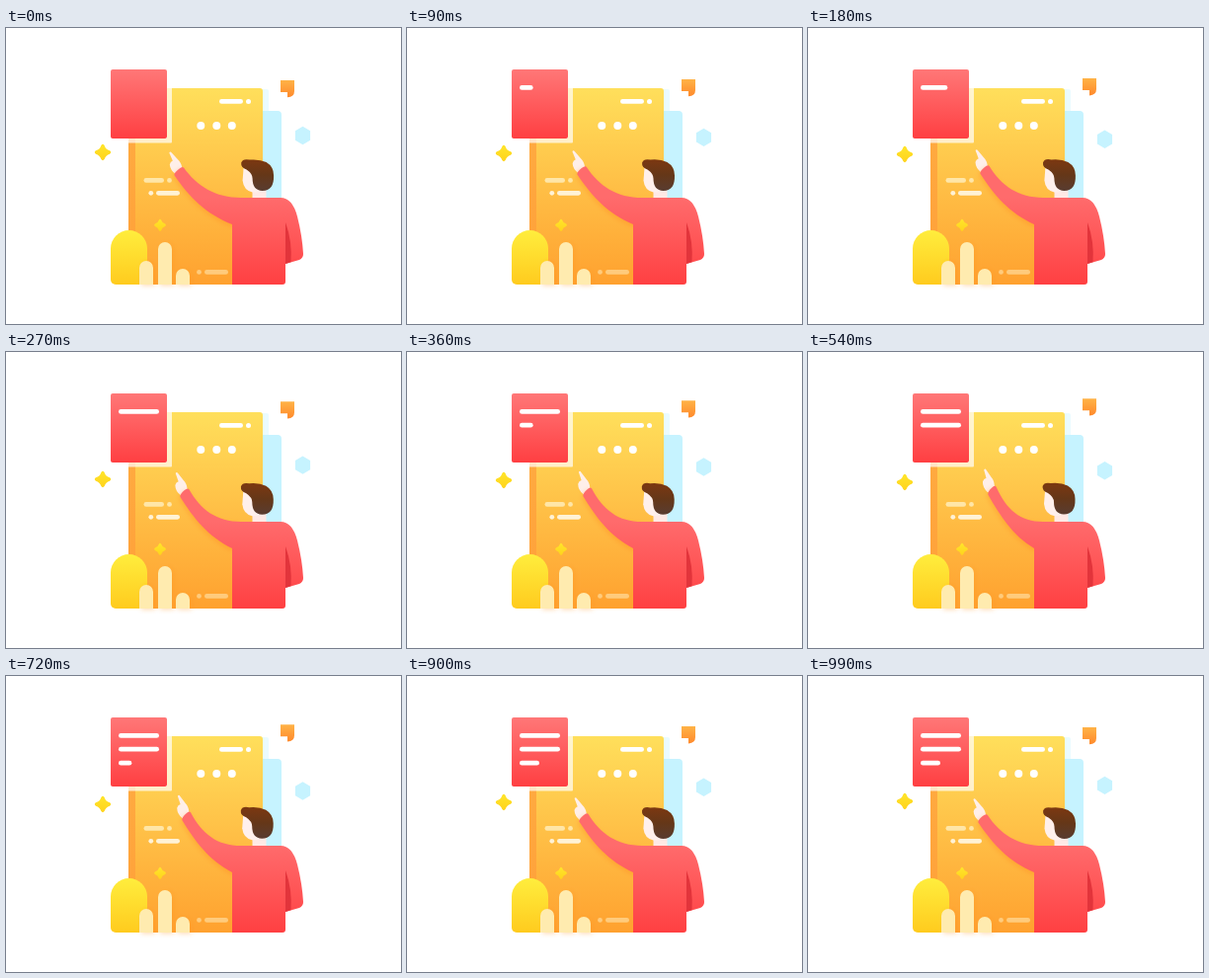
An HTML page with a canvas that plays this animation: 400x300 px, repeating every 1.08 s.

```html
<!DOCTYPE html>
<html lang="en">
<head>
<meta charset="utf-8">
<title>Presenter</title>
<style>
html, body { margin: 0; width: 100%; height: 100%; overflow: hidden; background: #fff; }
canvas { display: block; width: 400px; height: 300px; }
</style>
</head>
<body>
<canvas id="stage" width="400" height="300"></canvas>
<script>
const ctx = document.getElementById('stage').getContext('2d');
const STEP = 90, STEPS = 12;

const mix = (a, b, k) => a + (b - a) * k;
const clamp = v => Math.max(0, Math.min(1, v));

function grad(y0, y1, ...colors) {
  const g = ctx.createLinearGradient(0, y0, 0, y1);
  colors.forEach((c, i) => g.addColorStop(i / (colors.length - 1), c));
  return g;
}

function box(x, y, w, h, r, fill) {
  ctx.fillStyle = fill;
  ctx.beginPath();
  ctx.roundRect(x, y, w, h, r);
  ctx.fill();
}

function shape(d, fill) {
  ctx.fillStyle = fill;
  ctx.fill(new Path2D(d));
}

function dot(x, y, r, fill) {
  ctx.fillStyle = fill;
  ctx.beginPath();
  ctx.arc(x, y, r, 0, Math.PI * 2);
  ctx.fill();
}

const pill = (x, y, w, fill) => box(x, y, w, 4.8, 2.4, fill);

function at(x, y, angle, draw) {
  ctx.save();
  ctx.translate(x, y);
  ctx.rotate(angle);
  draw();
  ctx.restore();
}

function shadowed(color, blur, dx, dy, draw) {
  ctx.save();
  ctx.shadowColor = color;
  ctx.shadowBlur = blur;
  ctx.shadowOffsetX = dx;
  ctx.shadowOffsetY = dy;
  draw();
  ctx.restore();
}

function star(x, y, r) {
  at(x, y, 0, () => {
    ctx.scale(r, r);
    ctx.beginPath();
    for (let i = 0; i < 4; i++) {
      ctx.lineTo(-0.2, -0.86);
      ctx.quadraticCurveTo(0, -1.14, 0.2, -0.86);
      ctx.quadraticCurveTo(0.36, -0.36, 0.86, -0.2);
      ctx.rotate(Math.PI / 2);
    }
    ctx.closePath();
    ctx.fillStyle = grad(-1, 1, '#ffe52b', '#ffd31c');
    ctx.fill();
  });
}

function panel() {
  box(255, 62, 11, 130, 2, '#eafbff');
  box(250, 84, 29, 110, 4, '#c6f3ff');
  box(124, 61, 136, 199, 3, grad(61, 260, '#ffdf5b', '#ffbf46', '#ffa12f'));
  box(124, 61, 7, 199, [3, 0, 0, 3], grad(110, 260, '#ffaa40', '#ff9f38'));
  ctx.fillStyle = '#fff';
  ctx.fillRect(104, 40, 59, 72);
  ctx.fillRect(120, 58, 43, 54);
  box(101, 37, 67, 79.5, 1, 'rgba(255,255,255,.7)');

  pill(216, 72, 24, '#fff');
  dot(245.5, 74.4, 2.5, '#fff');
  for (const x of [197.3, 213.3, 228.8]) dot(x, 99, 4, '#fff');
  pill(139.5, 152, 20.5, '#ffe6a8');
  dot(165.5, 154.4, 2.4, '#ffe6a8');
  dot(146.8, 167.3, 2.4, '#fff2d6');
  pill(152, 164.9, 24, '#fff2d6');
  dot(195.5, 247.4, 2.4, '#ffcb7c');
  pill(201, 245, 24, '#ffcb7c');
  star(156, 199.8, 6);
}

function card(step) {
  box(106, 42, 57, 70, 2, grad(42, 112, '#ff7777', '#ff3f42'));
  const lines = [[58, 41], [71.8, 41], [85.8, 20]];
  lines.forEach(([y, w], i) => {
    const len = w * clamp((step - i * 3) / 3);
    if (len > 0) pill(114, y, len, '#fff');
  });
}

function chart() {
  box(106, 205, 37, 55, [18.5, 18.5, 0, 5], grad(205, 260, '#ffed3d', '#ffcb1e'));
  shadowed('rgba(255,145,30,.35)', 5, 2, 1, () => {
    for (const [x, y] of [[135, 236], [154, 217], [172, 244]])
      box(x, y, 14, 260 - y, [7, 7, 0, 0], '#ffebaf');
  });
}

function head(k) {
  box(249.5, 160, 14, 14, 0, '#ffe9e5');
  at(0.6 * (1 - k), 0.6 * (1 - k), 0, () => {
    shape('M240 141 H256 V166 H249 Q240 164 239 154 Z', '#fff0ec');
    shape('M243 143 Q237 141 237.6 136 Q239 131.5 246 133 Q256 132 263 135.5 ' +
      'Q270.5 140 270.5 149 Q271 164.5 259 164.5 Q249 164 249 152 Q249 147 243 143 Z',
      grad(133, 164, '#7c3811', '#653718', '#593c30'));
  });
}

function hand(k) {
  at(mix(174.3, 184.5, k), mix(144.5, 138.5, k), mix(0, 0.145, k), () => {
    shape('M-9 -18 Q-8 -20 -6.5 -18 L-0.5 -11.5 Q3 -8.5 4 -3 L5 0 L-2 4 ' +
      'Q-8 0 -8.5 -6 Q-8 -9 -5.5 -10 Z', '#ffefe9');
  });
}

function arm(k) {
  const p = (x0, y0, x1, y1) => mix(x0, x1, k) + ' ' + mix(y0, y1, k) + ' ';
  const d = 'M' + p(180, 141.5, 190.5, 136.5) +
    'C' + p(193, 160, 201, 160) + p(212, 172, 215, 172) + '238 172 ' +
    'V200 L229 199 ' +
    'C' + p(202, 188, 207, 186) + p(186, 172, 194, 165) + p(170.3, 149, 182.3, 144.5) +
    'Q' + p(170.5, 146.5, 182, 141.5) + p(175, 143, 186, 137.7) +
    'Q' + p(178.5, 140, 189, 134.8) + p(180, 141.5, 190.5, 136.5) + 'Z';
  shadowed('rgba(255,135,30,.4)', 5, -1, 2, () => shape(d, grad(172, 260, '#ff6b6c', '#ff4042')));
}

function body() {
  const red = grad(172, 260, '#ff6b6c', '#ff4042');
  shape('M229 172 H278 Q290 172 295 191 Q300 211 301 229 Q301 233 297 235 ' +
    'L283 239 V257 Q283 260 280 260 H229 Z', red);
  shape('M283 197 Q290 216 288.5 237.3 L283 239 Z', '#e2343b');
}

function ornaments(k) {
  star(98, mix(126, 132, k), 8.2);
  at(278, mix(53, 47.3, k), 0, () =>
    shape('M0 0 H14 V11 Q14 17 7 17.3 V12 H0 Z', grad(0, 17, '#ffb347', '#ff8a2c')));
  at(300.5, mix(109, 120.3, k), 0, () =>
    shape('M0 -9.2 L7.6 -4.7 V4.7 L0 9.2 L-7.6 4.7 V-4.7 Z', '#c6f3ff'));
}

function frame(now) {
  const step = Math.floor((now + 1) / STEP) % STEPS;
  const k = 1 - Math.abs(step - 6) / 6;
  ctx.fillStyle = '#fff';
  ctx.fillRect(0, 0, 400, 300);
  panel();
  card(step);
  chart();
  head(k);
  hand(k);
  arm(k);
  body();
  ornaments(k);
  requestAnimationFrame(frame);
}
requestAnimationFrame(frame);
</script>
</body>
</html>
```
